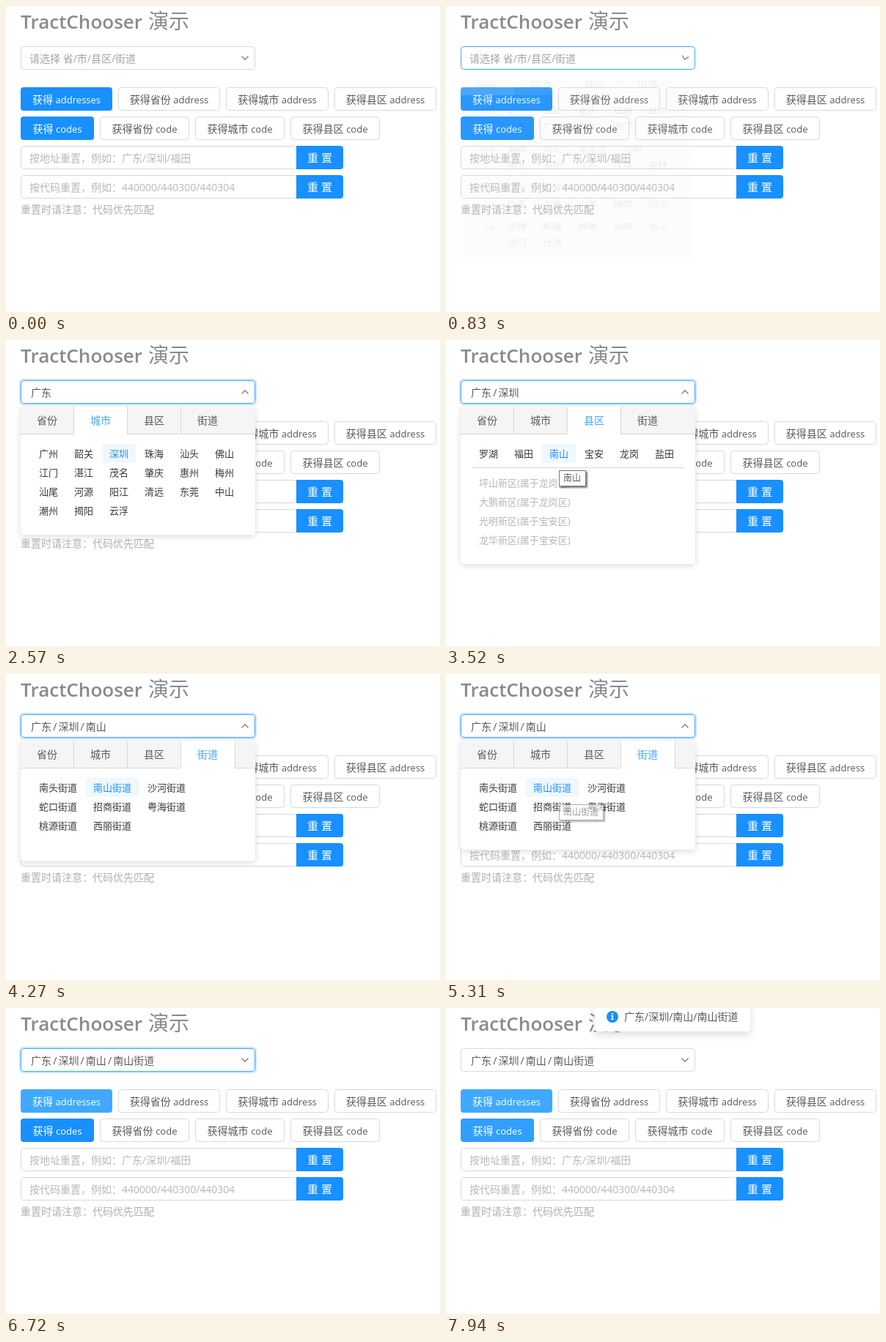
An HTML page with a canvas for the animation above (8 s loop, 592 by 418 pixels).

```html
<!DOCTYPE html>
<html lang="zh-CN">
<head>
<meta charset="utf-8">
<title>演示</title>
<style>
html, body { margin: 0; width: 100%; height: 100%; overflow: hidden; background: #fff; }
canvas { display: block; }
</style>
</head>
<body>
<canvas id="stage" width="592" height="418"></canvas>
<script>
const ctx = document.getElementById('stage').getContext('2d');
const LOOP = 8000;
const FONT = '"Open Sans", "Noto Sans CJK SC", "Noto Sans CJK", sans-serif';
const BLUE = '#1890ff', LIGHT_BLUE = '#40a9ff', INK = '#595959', BORDER = '#d9d9d9', HINT = '#b8b8b8';

const TABS = ['省份', '城市', '县区', '街道'];
const PATH = ['广东', '深圳', '南山', '南山街道'];
const row = (y, words, label) => ({ y, words: words.split(' '), label });
const provinceRows = [
  ['A-G', '北京 安徽 重庆 福建 甘肃', '广东 广西 贵州 澳门'],
  ['H-K', '海南 河北 黑龙江 河南', '湖北 湖南 江苏 江西 吉林'],
  ['L-S', '辽宁 内蒙古 宁夏 青海', '山东 上海 山西 陕西 四川'],
  ['T-Z', '天津 新疆 西藏 云南 浙江', '澳门 台湾']
].flatMap(([label, first, second], i) => {
  const y = Math.round(155 + i * 64.6);
  return [row(y, first, label), row(y + 26, second)];
});
const listRows = lines => lines.map((words, i) => row(155 + i * 26, words));

// Each panel replaces the one before it at its start time.
const PANELS = [
  { start: 830, bottom: 407, x: 84, rows: provinceRows },
  { start: 2050, bottom: 266, x: 45, rows: listRows([
    '广州 韶关 深圳 珠海 汕头 佛山', '江门 湛江 茂名 肇庆 惠州 梅州',
    '汕尾 河源 阳江 清远 东莞 中山', '潮州 揭阳 云浮']) },
  { start: 2730, bottom: 306, x: 45, rows: listRows(['罗湖 福田 南山 宝安 龙岗 盐田']),
    disabled: ['坪山新区(属于龙岗区)', '大鹏新区(属于龙岗区)', '光明新区(属于宝安区)', '龙华新区(属于宝安区)'] },
  { start: 4090, bottom: 240, x: 45, rows: listRows([
    '南头街道 南山街道 沙河街道', '蛇口街道 招商街道 粤海街道', '桃源街道 西丽街道']) }
];
const PICK_LAST = 5400, BLUR = 6890;

const ramp = (t, from, to) => Math.min(1, Math.max(0, (t - from) / (to - from)));
const ease = (t, from, to) => 1 - (1 - ramp(t, from, to)) ** 2;
const pulse = (t, on, off, fade) => ramp(t, on, on + fade) - ramp(t, off, off + fade);
const channels = hex => [1, 3, 5].map(i => parseInt(hex.slice(i, i + 2), 16));
function mix(a, b, p) {
  const end = channels(b);
  return `rgb(${channels(a).map((v, i) => Math.round(v + (end[i] - v) * p))})`;
}

// Latin letters are set slightly smaller than the Chinese around them.
function text(string, x, cy, { size = 14, color = INK, align = 0, weight = 400 } = {}) {
  const runs = string.match(/[A-Za-z-]+|[^A-Za-z-]+/g).map(s => {
    const font = `${weight} ${/[A-Za-z]/.test(s) ? size * .93 : size}px ${FONT}`;
    ctx.font = font;
    return { s, font, width: ctx.measureText(s).width };
  });
  x -= align * runs.reduce((sum, r) => sum + r.width, 0);
  ctx.fillStyle = color;
  for (const r of runs) {
    ctx.font = r.font;
    ctx.fillText(r.s, x, cy + Math.round(size * .36));
    x += r.width;
  }
}

function fillBox(x, y, w, h, radius, color) {
  ctx.fillStyle = color;
  ctx.beginPath();
  ctx.roundRect(x, y, w, h, radius);
  ctx.fill();
}

function outline(x, y, w, h, radius, color) {
  ctx.strokeStyle = color;
  ctx.lineWidth = 1;
  ctx.beginPath();
  ctx.roundRect(x + .5, y + .5, w - 1, h - 1, radius);
  ctx.stroke();
}

function shadowBox(x, y, w, h, dy, blur) {
  ctx.save();
  ctx.shadowColor = 'rgba(0,0,0,.15)';
  ctx.shadowOffsetY = dy;
  ctx.shadowBlur = blur;
  fillBox(x, y, w, h, 4, '#fff');
  ctx.restore();
}

function ring(x, y, w, h, spread, alpha) {
  ctx.strokeStyle = `rgba(24,144,255,${alpha})`;
  ctx.lineWidth = spread;
  ctx.beginPath();
  ctx.roundRect(x - spread / 2, y - spread / 2, w + spread, h + spread, 4 + spread / 2);
  ctx.stroke();
}

function primaryButton(label, x, y, w, { hover = 0, radius = 4, size = 14 } = {}) {
  fillBox(x, y, w, 32, radius, mix(BLUE, LIGHT_BLUE, hover));
  text(label, x + w / 2, y + 17, { size, color: '#fff', align: .5, weight: 500 });
}

function plainButton(label, x, y, w, hover = 0) {
  outline(x, y, w, 32, 4, mix(BORDER, LIGHT_BLUE, hover));
  text(label, x + w / 2, y + 17, { color: mix(INK, LIGHT_BLUE, hover), align: .5 });
}

function resetRow(hint, y) {
  outline(20, y, 378, 32, 4, BORDER);
  text(hint, 32, y + 17, { color: HINT });
  primaryButton('重 置', 396, y, 64, { radius: [0, 4, 4, 0], size: 15 });
}

function drawButtons(t) {
  const wave = ramp(t, BLUR, BLUR + 420);
  if (wave > 0 && wave < 1) ring(20, 111, 125, 32, 6 * wave, .25 * (1 - wave));
  primaryButton('获得 addresses', 20, 111, 125, { hover: ramp(t, 6470, 6700) });
  plainButton('获得省份 address', 153, 111, 139);
  plainButton('获得城市 address', 300, 111, 140);
  plainButton('获得县区 address', 448, 111, 139);
  primaryButton('获得 codes', 20, 151, 100, { hover: pulse(t, 6370, 6470, 200) + ramp(t, 7770, 8050) });
  plainButton('获得省份 code', 128, 151, 122, pulse(t, 6270, 6370, 200));
  plainButton('获得城市 code', 258, 151, 122);
  plainButton('获得县区 code', 388, 151, 122);
}

function drawSelect(t, depth, open) {
  const focus = ramp(t, 820, 1000) - ramp(t, BLUR, BLUR + 280);
  const active = ramp(t, 500, 720) - ramp(t, BLUR, BLUR + 280);
  if (focus > 0) ring(20, 55, 320, 32, 2, .25 * focus);
  fillBox(20, 55, 320, 32, 4, '#fff');
  outline(20, 55, 320, 32, 4, mix(BORDER, LIGHT_BLUE, active));
  if (!depth) text('请选择 省/市/县区/街道', 32, 72, { color: '#a3a3a3' });
  for (let i = 0; i < depth; i++) {
    const x = 34 + i * 37.4;
    text(PATH[i], x, 72);
    if (i < depth - 1) text('/', x + 30.2, 72);
  }
  ctx.save();
  ctx.translate(326, 71);
  ctx.rotate(Math.PI * open);
  ctx.strokeStyle = '#7f7f7f';
  ctx.lineWidth = 1.3;
  ctx.beginPath();
  ctx.moveTo(-4.5, -2.5);
  ctx.lineTo(0, 2.2);
  ctx.lineTo(4.5, -2.5);
  ctx.stroke();
  ctx.restore();
}

function drawTabs(current) {
  ctx.fillStyle = '#f5f5f5';
  ctx.fillRect(20, 91, 320, 37);
  ctx.fillStyle = BORDER;
  ctx.fillRect(20, 128, 320, 1);
  ctx.fillStyle = '#fff';
  ctx.fillRect(20 + current * 73, 91, 73, 38);
  TABS.forEach((label, i) => {
    const x = 20 + i * 73;
    ctx.fillStyle = BORDER;
    if (i < 3) ctx.fillRect(x + 72, 91, 1, 38);
    else if (current === 3) ctx.fillRect(x + 73, 91, 1, 38);
    text(label, x + 22, 110, { color: i === current ? LIGHT_BLUE : INK });
  });
}

function drawItems(t, panel) {
  const cursor = t < 1570 ? null : t < 2480 ? [97, 181] : [154, 157];
  const hoverBlue = ramp(t, 1590, 1800);
  for (const { y, words, label } of panel.rows) {
    if (label) text(label, 68, y, { color: '#484848', align: 1 });
    let x = panel.x;
    for (const word of words) {
      const w = word.length * 13;
      const hot = cursor && Math.abs(cursor[1] - y) < 13 && cursor[0] > x - 10 && cursor[0] < x + w + 10;
      if (hot) fillBox(x - 10, y - 13, w + 20, 26, 2, '#f0f8ff');
      text(word, x, y, { size: 13, color: mix('#383838', BLUE, hot ? hoverBlue : 0) });
      x += w + 22;
    }
  }
  if (panel.disabled) {
    ctx.fillStyle = BORDER;
    ctx.fillRect(35, 174, 290, 1);
    panel.disabled.forEach((s, i) => text(s, 45, 195 + i * 26, { size: 13, color: HINT }));
  }
}

function drawPanel(t, current, open) {
  if (open <= 0) return;
  const panel = PANELS[current];
  const previous = PANELS[Math.max(0, current - 1)];
  const grow = ease(t, panel.start, panel.start + 350);
  const height = previous.bottom + (panel.bottom - previous.bottom) * grow - 91;
  ctx.save();
  ctx.globalAlpha = open;
  ctx.translate(0, 91);
  ctx.scale(1, .8 + .2 * open);
  ctx.translate(0, -91);
  shadowBox(20, 91, 320, height, 2, 8);
  ctx.beginPath();
  ctx.roundRect(20, 91, 320, height, 4);
  ctx.clip();
  drawTabs(current);
  drawItems(t, panel);
  ctx.restore();
}

function drawTooltip(label, alpha) {
  if (alpha <= 0) return;
  const w = label.length * 12 + 13;
  ctx.save();
  ctx.globalAlpha = alpha;

  // The shadow stays outside the box so that it does not show through while fading.
  ctx.save();
  ctx.beginPath();
  ctx.rect(150, 174, w + 12, 34);
  ctx.rect(154, 178, w, 22);
  ctx.clip('evenodd');
  ctx.shadowColor = 'rgba(0,0,0,.5)';
  ctx.shadowOffsetX = ctx.shadowOffsetY = 2;
  ctx.shadowBlur = 2;
  fillBox(154, 178, w, 22, 0, '#fff');
  ctx.restore();

  fillBox(154, 178, w, 22, 0, '#fff');
  outline(154, 178, w, 22, 0, '#767676');
  text(label, 160, 189, { size: 12, color: '#575757' });
  ctx.restore();
}

function drawToast(t) {
  const p = ease(t, 6940, 7300);
  if (p <= 0) return;
  ctx.save();
  ctx.globalAlpha = p;
  ctx.translate(0, -41 * (1 - p));
  shadowBox(203, -9, 212, 41, 4, 12);
  fillBox(219, 4, 16, 16, 8, BLUE);
  ctx.fillStyle = '#fff';
  ctx.fillRect(226, 7, 2, 2);
  ctx.fillRect(225, 10, 3, 1);
  ctx.fillRect(226, 10, 2, 6);
  ctx.fillRect(225, 15, 4, 1);
  text(PATH.join('/'), 243, 12);
  ctx.restore();
}

function draw(t) {
  ctx.fillStyle = '#fff';
  ctx.fillRect(0, 0, 592, 418);
  const current = Math.max(0, PANELS.filter(p => t >= p.start).length - 1);
  const depth = t >= PICK_LAST ? 4 : current;
  const open = ease(t, 820, 1100) - ease(t, PICK_LAST, PICK_LAST + 250);

  text('TractChooser', 20, 21, { size: 28, color: '#8a8a8a', weight: 600 });
  text('演示', 194, 21, { size: 28, color: '#8a8a8a' });
  drawButtons(t);
  resetRow('按地址重置，例如：广东/深圳/福田', 191);
  resetRow('按代码重置，例如：440000/440300/440304', 231);
  text('重置时请注意：代码优先匹配', 20, 278, { color: '#b0b0b0' });
  drawSelect(t, depth, open);
  drawPanel(t, current, open);
  drawTooltip('南山', ramp(t, 3260, 3520) - ramp(t, 3980, 4130));
  drawTooltip('南山街道', ramp(t, 4730, 4860) - ramp(t, 5250, 5400));
  drawToast(t);
}

function frame() {
  draw(performance.now() % LOOP);
  requestAnimationFrame(frame);
}
frame();
</script>
</body>
</html>
```
